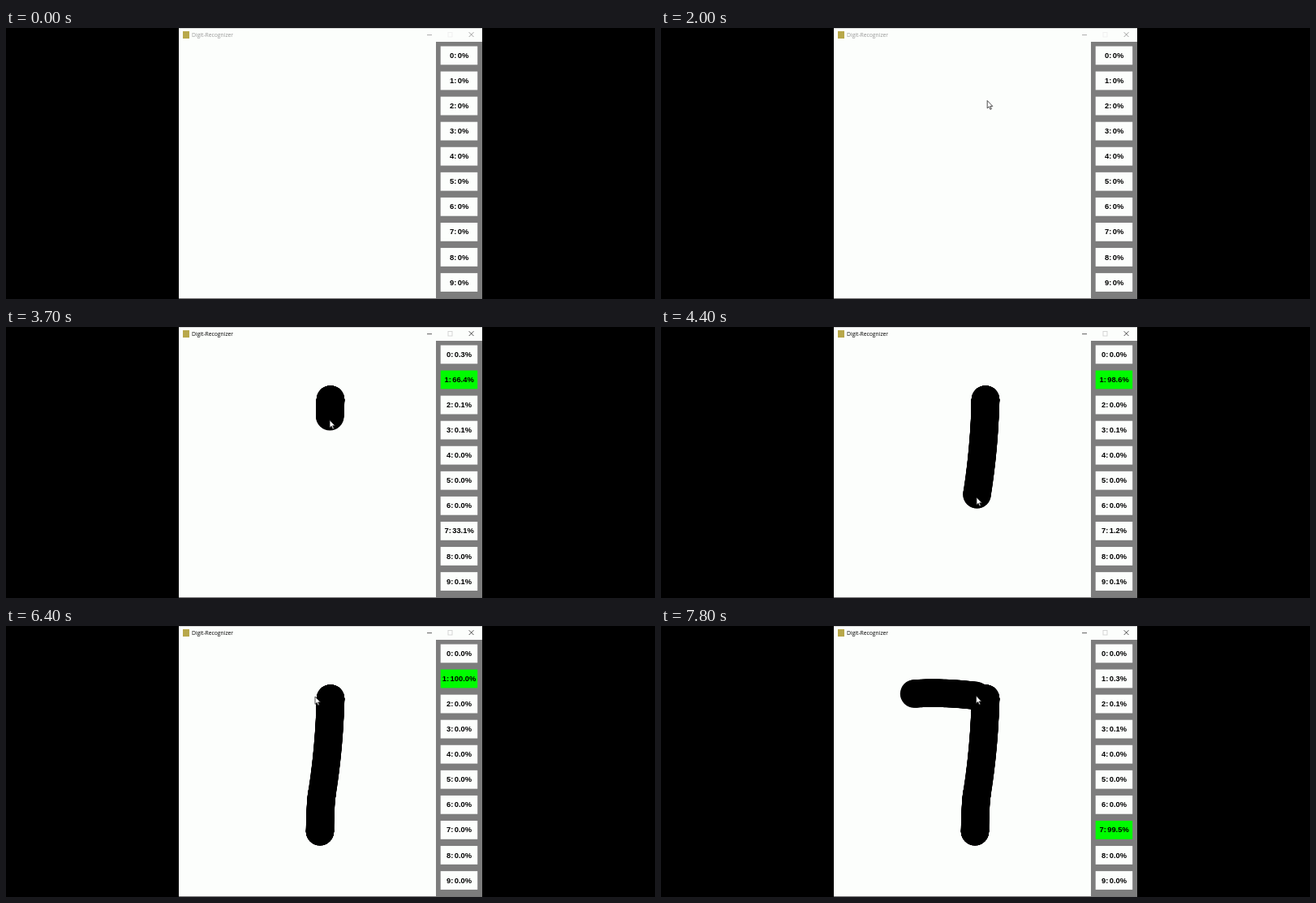
Animation of 800x334 px, one loop 8000 ms. Source, as an HTML page with a canvas:

```html
<!DOCTYPE html>
<html lang="en">
<head>
<meta charset="utf-8">
<title>Digit-Recognizer</title>
<style>
html, body { margin: 0; height: 100%; overflow: hidden; background: #000; }
canvas { display: block; }
</style>
</head>
<body>
<canvas id="stage" width="800" height="334"></canvas>
<script>
const ctx = document.getElementById('stage').getContext('2d');
const LOOP = 8000, STEP = 100, PEN_LAG = 50;
const ENTER_AT = 300, FOCUS_AT = 2400, FIRST_INK = 3200, SURE_AT = 5000, SECOND_INK = 7300;
const BRUSH = 17.2;

const linear = p => p;
const easeIn = p => p * p;
const easeOut = p => p * (2 - p);
const logistic = x => 1 / (1 + Math.exp(-x));

// Each move is a quadratic curve that begins where the previous one ended.
const moves = [];
let last = [525, 185];
function move(start, end, ease, to, bend, ink = false) {
  const from = last;
  const mid = bend || from.map((v, i) => (v + to[i]) / 2);
  moves.push({ start, end, ease, from, mid, to, ink });
  last = to;
}
move(ENTER_AT, 700, linear, [394, 140], [440, 165]);
move(700, 1100, linear, [427, 90], [417, 107]);
move(1150, 1400, easeOut, [431, 77]);
move(1850, 2100, easeOut, [401, 90]);
move(2300, 2600, easeOut, [399, 97.7]);
move(3000, FIRST_INK, linear, [400, 89.5]);
move(FIRST_INK, 4400, easeIn, [389.5, 206.3], [398.5, 150], true);
move(4400, 5100, easeOut, [387, 253.3], [387.5, 218], true);
move(5250, 6100, easeOut, [402, 105]);
move(6150, 6450, linear, [381, 87]);
move(6450, 7200, linear, [312, 83.5], [340, 62]);
move(SECOND_INK, 7800, linear, [388.5, 86], [345, 81], true);

function pointOn(m, t) {
  const p = m.ease(Math.min(1, Math.max(0, (t - m.start) / (m.end - m.start))));
  const q = 1 - p;
  return m.from.map((v, i) => q * q * v + 2 * p * q * m.mid[i] + p * p * m.to[i]);
}

function percentages(t) {
  const p = Array(10).fill(0);
  if (t < FIRST_INK) return p;
  if (t < SURE_AT) {
    p[7] = 100 * logistic((3567 - t) / 189);
    p[0] = .008 * p[7];
    p[2] = .0025 * p[7];
    p[3] = p[9] = .08;
  } else if (t >= SECOND_INK) {
    p[7] = 100 * logistic((t - 7550) / 47);
    p[2] = p[3] = .08;
  }
  p[1] = 100 - p.reduce((a, b) => a + b);
  return p;
}

function rect(color, x, y, w, h) {
  ctx.fillStyle = color;
  ctx.fillRect(x, y, w, h);
}

function line(color, width, ...points) {
  ctx.strokeStyle = color;
  ctx.lineWidth = width;
  ctx.beginPath();
  points.forEach(p => ctx.lineTo(...p));
  ctx.stroke();
}

function drawWindow(active) {
  rect('#000', 0, 0, 800, 334);
  rect('#fcfefc', 213, 0, 374, 333);
  rect('#aaa', 213, 0, 374, .5);
  rect('#777', 213, 333, 374, 1);
  rect('#b8a84a', 218, 4, 8, 9);

  ctx.font = '6.75px "Open Sans", sans-serif';
  ctx.textAlign = 'left';
  ctx.wordSpacing = '0px';
  ctx.fillStyle = active ? '#000' : '#999';
  ctx.fillText('Digit-Recognizer', 229, 10.8);

  const ink = active ? '#222' : '#888';
  ctx.lineCap = 'butt';
  line(ink, .7, [519, 8.6], [525, 8.6]);
  line(ink, .8, [570.7, 5.2], [576.5, 11]);
  line(ink, .8, [576.5, 5.2], [570.7, 11]);
  ctx.strokeStyle = active ? '#ccc' : '#eee';
  ctx.strokeRect(545, 5.5, 5, 5.5);
}

function drawPanel(t) {
  rect('#7d7d7d', 530, 17, 57, 316);
  const started = t >= FIRST_INK;
  const values = percentages(t);
  const best = started ? values.indexOf(Math.max(...values)) : -1;
  ctx.font = 'bold 9.4px "Liberation Sans", Arial, sans-serif';
  ctx.textAlign = 'center';
  ctx.wordSpacing = '-1.2px';
  values.forEach((value, digit) => {
    const y = 22.5 + 31.07 * digit;
    rect(digit === best ? '#00fc00' : '#fcfefc', 535.7, y, 45.5, 22.8);
    ctx.fillStyle = '#000';
    ctx.fillText(`${digit}: ${started ? value.toFixed(1) : 0}%`, 558.6, y + 14.5);
  });
}

function drawInk(m, t) {
  if (t < m.start) return;
  const end = Math.min(t, m.end);
  ctx.fillStyle = '#000';
  for (let s = m.start; s <= end; s += 10) {
    ctx.beginPath();
    ctx.arc(...pointOn(m, s), BRUSH, 0, Math.PI * 2);
    ctx.fill();
  }
}

function drawCursor(t) {
  if (t < ENTER_AT) return;
  const lead = t + PEN_LAG;
  const current = moves.filter(m => m.start <= lead).pop();
  ctx.save();
  ctx.translate(...pointOn(current, lead));
  const arrow = new Path2D('M0 0V9.4L2.2 7.4 3.7 10.9 5.2 10.2 3.7 6.9H6.6Z');
  ctx.fillStyle = '#fff';
  ctx.fill(arrow);
  ctx.strokeStyle = '#222';
  ctx.lineWidth = .8;
  ctx.stroke(arrow);
  ctx.restore();
}

function frame() {
  const t = Math.floor(performance.now() % LOOP / STEP) * STEP;
  drawWindow(t >= FOCUS_AT);
  drawPanel(t);
  moves.filter(m => m.ink).forEach(m => drawInk(m, t));
  drawCursor(t);
  requestAnimationFrame(frame);
}
frame();
</script>
</body>
</html>
```
